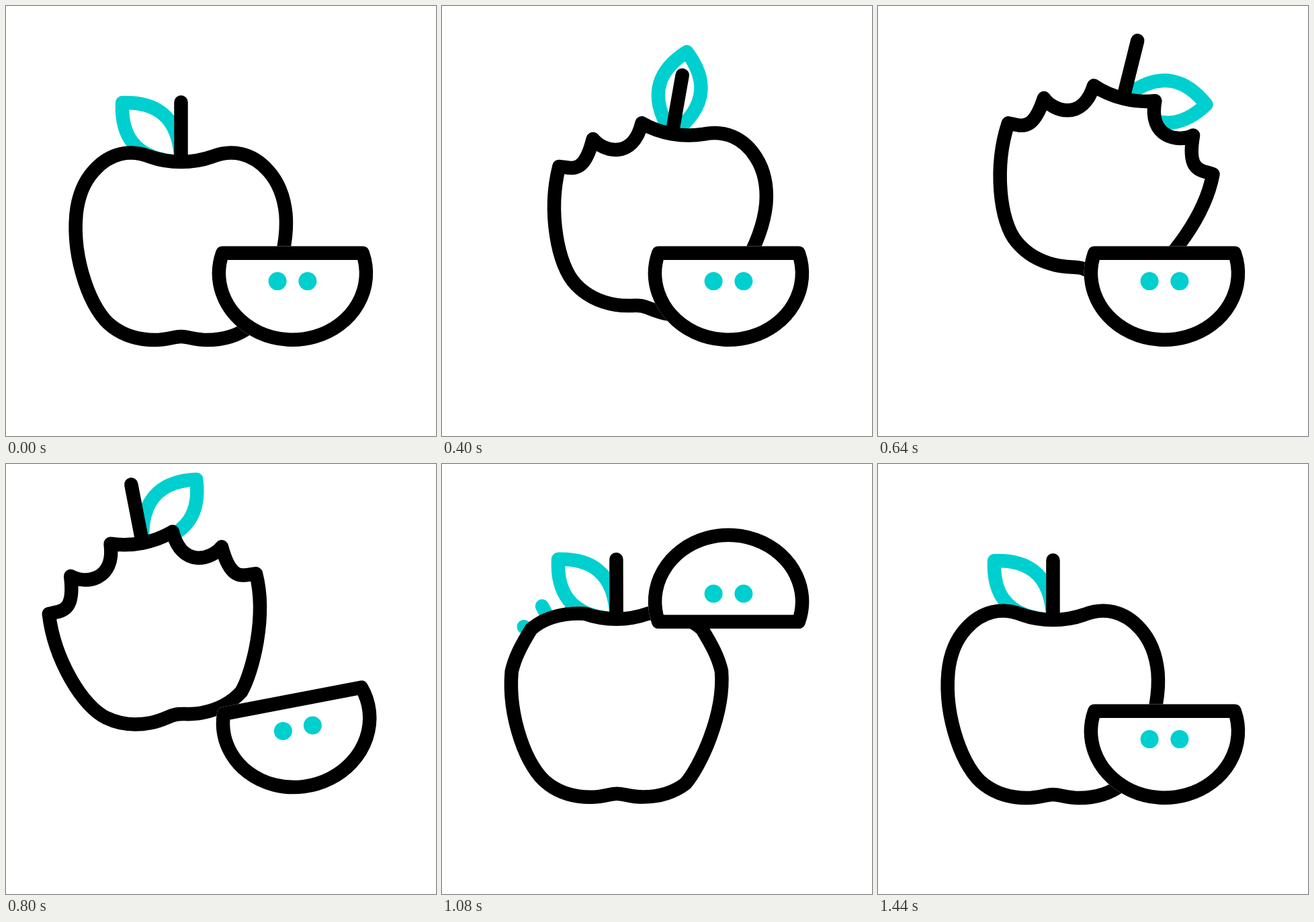
Write an HTML page with a canvas that moves like this. It is 640x640 px and loops after 2 s.

```html
<!DOCTYPE html>
<html lang="en">
<head>
<meta charset="utf-8">
<title>Apple</title>
<style>
  html, body { margin: 0; width: 100%; height: 100%; overflow: hidden; background: #fff; }
  canvas { display: block; width: 100vmin; height: 100vmin; }
</style>
</head>
<body>
<canvas id="stage" width="640" height="640"></canvas>
<script>
const ctx = document.getElementById('stage').getContext('2d');
const LOOP = 2000, STEP = 40, WIDTH = 20.5;
const BLACK = '#000', TEAL = '#00cfcf';
const RAD = Math.PI / 180;

const mix = (a, b, k) => a + (b - a) * k;

// Sine ease from 0 to 1 between two times
function ease(t, from, to) {
  const p = Math.min(1, Math.max(0, (t - from) / (to - from)));
  return (1 - Math.cos(Math.PI * p)) / 2;
}

// Smooth curve through [time, value] keys, flat at every extreme
function track(keys) {
  const slope = i => (keys[i + 1][1] - keys[i][1]) / (keys[i + 1][0] - keys[i][0]);
  const tangent = keys.map((_, i) => {
    if (i === 0 || i === keys.length - 1) return 0;
    const a = slope(i - 1), b = slope(i);
    return a * b <= 0 ? 0 : 2 * a * b / (a + b);
  });
  return t => {
    if (t <= keys[0][0]) return keys[0][1];
    const i = keys.findIndex(k => k[0] >= t) - 1;
    if (i < 0) return keys[keys.length - 1][1];
    const [t0, v0] = keys[i], [t1, v1] = keys[i + 1];
    const h = t1 - t0, s = (t - t0) / h, r = 1 - s;
    return r * r * (1 + 2 * s) * v0 + s * s * (3 - 2 * s) * v1
      + h * s * r * (r * tangent[i] - s * tangent[i + 1]);
  };
}

// Apple poses: time, x, y, turn and the leaf's own swing
const poses = [
  [200, 0, 0, 0, 0],
  [400, 66.5, -43, 10, 45],
  [640, 83, -97, 14, 125],
  [800, -40.5, -116, -11, 96],
  [960, -18, -40, -4.2, 23],
  [1100, 0, 0, 0, 0]
];
const [poseX, poseY, poseTurn, poseLeaf] =
  [1, 2, 3, 4].map(column => track(poses.map(pose => [pose[0], pose[column]])));

// Half of the apple, as Bezier points to one side of its axis
const CROWN = [[0, 232], [16, 232], [33, 229], [47, 224]];
const WHOLE = [[75, 213], [105.5, 218], [129.5, 245], [145, 262], [153.5, 285], [156, 310]];
const BITTEN = [[50.5, 280], [96, 276], [114.5, 260], [118.5, 316], [138.5, 307], [157, 309]];
const RIGHT_FLANK = [[161, 375], [124, 452]];
const LEFT_FLANK = [[162, 377], [134, 455]];
const FOOT = [[102, 477.5], [84, 491], [61.5, 497], [39, 497], [20.5, 497], [10.5, 492], [0, 492]];

function half(bite, flank) {
  const shoulder = WHOLE.map(([x, y], i) => [mix(x, BITTEN[i][0], bite), mix(y, BITTEN[i][1], bite)]);
  return [...CROWN, ...shoulder, ...flank, ...FOOT];
}

const mirrorBack = points => points.map(([x, y]) => [-x, y]).reverse();

// Adds curves for points whose first one is the current position
function curves(points) {
  for (let i = 1; i < points.length; i += 3) ctx.bezierCurveTo(...points.slice(i, i + 3).flat());
}

function symmetric(right, left = right) {
  ctx.beginPath();
  ctx.moveTo(...right[0]);
  curves(right);
  curves(mirrorBack(left));
  ctx.closePath();
}

function paint(color, fill) {
  if (fill) {
    ctx.fillStyle = '#fff';
    ctx.fill();
  }
  ctx.strokeStyle = color;
  ctx.stroke();
}

function line(x0, y0, x1, y1, color) {
  ctx.beginPath();
  ctx.moveTo(x0, y0);
  ctx.lineTo(x1, y1);
  paint(color);
}

function rotateAt(x, y, degrees) {
  ctx.translate(x, y);
  ctx.rotate(degrees * RAD);
}

function drawRays(t) {
  const outer = mix(50, 152, ease(t, 1040, 1230));
  const inner = mix(50, 152, ease(t, 1089, 1380));
  if (outer - inner < 1) return;
  for (const [x, y, side] of [[178, 265, -1], [385, 247, 1]]) {
    for (const angle of [-16.5, 28.5, 68]) {
      const dx = side * Math.sin(angle * RAD), dy = -Math.cos(angle * RAD);
      line(x + dx * inner, y + dy * inner, x + dx * outer, y + dy * outer, TEAL);
    }
  }
}

function drawLeaf(t) {
  ctx.save();
  rotateAt(0, 232, poseLeaf(t) - 44.8);
  symmetric([[0, 0], [51, -54], [31.5, -95], [0, -124]]);
  paint(TEAL, true);
  ctx.restore();
}

function drawApple(t) {
  const healed = 1 - ease(t, 960, 1120);
  const left = ease(t, 240, 390) * healed;
  const right = ease(t, 450, 610) * healed;
  ctx.save();
  rotateAt(260.5 + poseX(t), 320 + poseY(t), poseTurn(t));
  ctx.translate(0, -320);
  drawLeaf(t);
  symmetric(half(right, RIGHT_FLANK), half(left, LEFT_FLANK));
  paint(BLACK, true);
  line(0, 143.3, 0, 228, BLACK);
  ctx.restore();
}

function drawSlice(t) {
  const lift = ease(t, 720, 1080) - ease(t, 1080, 1440);
  const tilt = Math.asin(30 / 99);
  ctx.save();
  rotateAt(426.5, 367.8 - 133 * lift, -360 * ease(t, 720, 1440));
  ctx.beginPath();
  ctx.ellipse(0, 30, 109.5, 99, 0, -tilt, Math.PI + tilt);
  ctx.closePath();
  paint('#fff', true);
  paint(BLACK);
  ctx.fillStyle = TEAL;
  for (const x of [-22.4, 22.4]) {
    ctx.beginPath();
    ctx.arc(x, 41.8, 13.5, 0, 2 * Math.PI);
    ctx.fill();
  }
  ctx.restore();
}

function draw(t) {
  ctx.fillStyle = '#fff';
  ctx.fillRect(0, 0, 640, 640);
  ctx.lineWidth = WIDTH;
  ctx.lineCap = ctx.lineJoin = 'round';
  drawRays(t);
  drawApple(t);
  drawSlice(t);
}

const start = performance.now();
function tick() {
  const t = (performance.now() - start) % LOOP;
  draw(Math.floor(t / STEP) * STEP);
  requestAnimationFrame(tick);
}
tick();
</script>
</body>
</html>
```
